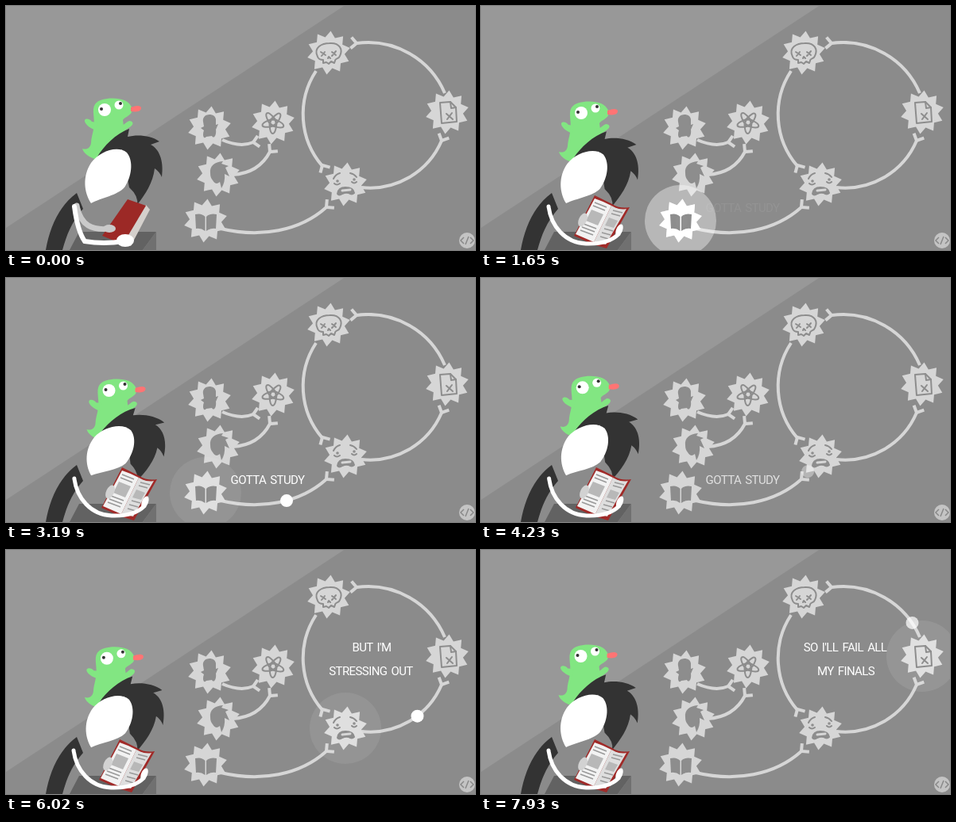
These frames come from a looping animation (590 px wide and 308 px high, 7990 ms). An HTML page:

```html
<!DOCTYPE html>
<html lang="en">
<head>
<meta charset="utf-8">
<title>Gotta study</title>
<style>
  html, body { margin: 0; width: 100%; height: 100%; overflow: hidden; background: #8b8b8b; }
  svg { display: block; width: 590px; height: 308px; }
  text { font: 400 15px Roboto, "Open Sans", sans-serif; letter-spacing: -.6px; word-spacing: 2px; fill: #fff; text-anchor: middle; }
  .line { fill: none; stroke: #d6d6d6; stroke-width: 4; }
  .ink { fill: none; stroke: #8d8d8d; stroke-width: 2; stroke-linejoin: round; stroke-linecap: round; }
  .solid { fill: #8d8d8d; }
  .arm { fill: none; stroke: #fff; stroke-width: 7; stroke-linecap: round; }
</style>
</head>
<body>
<svg viewBox="0 0 590 308">
  <rect width="590" height="308" fill="#8b8b8b"/>
  <path d="M0 0H425L0 280Z" fill="#989898"/>

  <g id="wires" class="line">
    <path d="M390 82A100 100 0 0 0 398 202"/>
    <path d="M552 110A105 105 0 0 0 441 47"/>
    <path d="M447 229A98 98 0 0 0 548 170"/>
    <path d="M270 281C320 293 370 284 403 254"/>
    <path d="M272 169Q295 179 311 172"/>
    <path d="M285 213Q318 211 332 184"/>
  </g>
  <g id="bursts"></g>
  <g id="halos" fill="#fff"></g>
  <g id="flashes"></g>
  <g id="icons">
    <g transform="translate(406 59)" class="ink">
      <path d="M-14 5C-20-7-8-12 1-12C14-13 18-4 14 4C13 8 8 7 8 10L7 13L3 11L0 14L-3 12L-7 13L-7 9C-10 9-13 8-14 5Z"/>
      <path d="M-10-1L-4 3M-5-1L-9 4M4-1L9 3M9-2L4 4M-1 7L0 5L2 7"/>
    </g>
    <g transform="translate(555 134)" class="ink">
      <path d="M-9-12L4-13L11-6L12 12L-7 14Z"/>
      <path d="M4-13L5-5L11-6M-1 2L7 9M6 1L0 9"/>
    </g>
    <g transform="translate(427 225)" class="ink">
      <path d="M-15-7Q-12-13-7-14M6-14Q11-13 14-9M-14-1Q-11 2-7-1M8-3Q11 0 14-3"/>
      <circle cx="-10" cy="-4" r=".8"/><circle cx="11" cy="-6" r=".8"/>
      <path class="solid" d="M-10 12Q-9 4 0 4Q10 4 11 11Q8 14 4 11Q0 10-4 12Q-8 15-10 12Z"/>
      <path d="M-4 8L6 7" style="stroke:#d6d6d6;stroke-width:3"/>
    </g>
    <g id="knot" transform="translate(336 147)" class="ink"></g>
    <path class="solid" d="M248 146C246 135 263 134 264 143L264 150L267 149L264 156C265 164 261 168 259 164L252 165C248 169 247 162 249 157L245 154L249 152Z"/>
    <path class="solid" d="M257 211C256 202 262 197 273 196L271 199L280 202L276 204L281 215L275 212Q276 222 271 230L269 222Q264 227 260 220Q257 217 257 211Z"/>
    <path class="solid" d="M238 263Q246 261 250.500 266V284Q245 280 239 281ZM252 266Q257 261 265 263L264 281Q257 280 252 284Z"/>
  </g>
  <circle id="pulse" r="8" fill="#fff"/>
  <g id="captions">
    <g><text x="329" y="260">GOTTA STUDY</text></g>
    <g><text x="460" y="128">BUT I'M</text><text x="459" y="158">STRESSING OUT</text></g>
    <g><text x="458" y="128">SO I'LL FAIL ALL</text><text x="459" y="158">MY FINALS</text></g>
  </g>

  <circle cx="580" cy="296" r="10" fill="#c4c4c4"/>
  <path d="M576 292L572 296L576 300M584 292L588 296L584 300M582 291L578 301" fill="none" stroke="#898989" stroke-width="1.500"/>

  <path d="M92 285H189L172 308H80Z" fill="#626262"/>
  <path d="M189 285V308H172Z" fill="#707070"/>
  <g id="critter">
    <path fill="#82e682" d="M114 194C103 190 98 186 96 180C102 182 106 179 107 173C107 167 109 162 110 156C113 144 107 131 112 124C118 115 140 115 149 119C157 123 160 129 158 134C156 139 149 140 147 144L148 152L152 164L130 194Z"/>
    <path id="leftPaw" fill="#82e682" d="M113 157C105 154 98 148 99 144C101 141 106 143 108 146L115 147Z"/>
    <path id="rightPaw" fill="#82e682" d="M143 150C148 152 150 147 155 145C160 145 161 149 157 152L145 160Z"/>
    <path fill="#ff7474" d="M157 128Q168 124 170 128Q171 135 157 133Z"/>
    <circle cx="124" cy="131" r="8" fill="#fff"/><circle cx="142" cy="125" r="5.500" fill="#fff"/>
    <circle cx="120" cy="130" r="2" fill="#333"/><circle cx="144" cy="123" r="2" fill="#333"/>
  </g>
  <path id="back" fill="#333" d="M89 236L97 256C82 273 76 290 71 308H50C55 280 66 253 89 236Z"/>
  <g id="torso">
    <path fill="#333" d="M115 190C123 177 138 161 155 155L153 165C165 162 182 163 193 171L182 175C192 180 199 194 196 216Q193 209 187 205C185 223 175 238 165 251Q167 240 155 229L146 181Z"/>
    <path fill="#fff" d="M107 249C98 235 96 215 107 198C117 184 140 175 152 185C161 196 158 216 149 229C140 239 120 242 107 249Z"/>
  </g>

  <g id="closedBook">
    <path class="arm" style="stroke:#cacaca" d="M89 252C94 277 108 284 132 281"/>
    <path d="M176 251L181 257L157 303L146 299Z" fill="#d4d0cc"/>
    <path d="M153 244L176 252L147 301L121 290Z" fill="#9c2926"/>
    <ellipse cx="130" cy="281" rx="8" ry="5" fill="#cacaca"/>
    <path class="arm" style="stroke-width:6" d="M86 253Q90 284 99 297Q123 301 148 297"/>
    <ellipse cx="150" cy="296" rx="11" ry="8" fill="#fff"/>
  </g>
  <g id="openBook">
    <path d="M143 239L165 250Q174 256 187 254L158 306L141 301L117 290Z" fill="#a02a28"/>
    <path d="M143 243Q155 247 164 252L142 298L119 288Z" fill="#f2f2f2"/>
    <path d="M164 252Q174 258 183 256L157 301L142 298Z" fill="#dedede"/>
    <g fill="none" stroke="#999" stroke-width="1.500">
      <path d="M143 248L158 254M141 252L156 258M129 275L145 281M127 279L143 285M125 283L141 289"/>
      <path d="M166 258L178 261M164 262L175 265M155 281L166 284M152 286L163 289M150 291L160 294"/>
    </g>
    <path d="M139 257L154 263L147 277L132 271ZM161 267L172 271L167 280L156 277Z" fill="#b8b8b8"/>
    <ellipse cx="128" cy="270" rx="5" ry="9" transform="rotate(25 128 270)" fill="#d2d2d2"/>
  </g>
  <g id="frontArm">
    <path class="arm" style="stroke-width:5" d="M85 253C88 278 106 299 132 300Q160 301 173 288"/>
    <ellipse cx="174" cy="283" rx="4" ry="8" transform="rotate(22 174 283)" fill="#fff"/>
  </g>
  <path id="cursor" d="M0 0V16L4 12.500L7 19L10 17.500L7 11.500H12Z" fill="#000" stroke="#fff"/>
</svg>
<script>
const LOOP = 7990, TRAVEL = 2720;
const $ = id => document.getElementById(id);
const clamp = v => Math.max(0, Math.min(1, v));
const make = (tag, attrs, parent) => {
  const el = document.createElementNS('http://www.w3.org/2000/svg', tag);
  for (const k in attrs) el.setAttribute(k, attrs[k]);
  return parent.appendChild(el);
};
const move = (id, value) => $(id).setAttribute('transform', value);
const show = (id, on) => $(id).setAttribute('visibility', on ? 'visible' : 'hidden');

// Eased interpolation through [time, value] pairs
function track(keys, t) {
  const i = keys.findIndex(k => k[0] > t);
  if (i < 0) return keys[keys.length - 1][1];
  if (i === 0) return keys[0][1];
  const [t0, a] = keys[i - 1], [t1, b] = keys[i];
  return a + (b - a) * (1 - Math.cos(Math.PI * (t - t0) / (t1 - t0))) / 2;
}

// Ten-pointed star with one spike pointing almost straight up
function burst(x, y, fill, parent) {
  const pts = Array.from({ length: 20 }, (_, i) => {
    const angle = -1.48 + i * Math.PI / 10;
    const r = i % 2 ? 20 : 27.5;
    return `${(x + r * Math.cos(angle)).toFixed(1)},${(y + r * Math.sin(angle)).toFixed(1)}`;
  });
  return make('polygon', { points: pts.join(' '), fill }, parent);
}

[[406, 59], [555, 134], [427, 225], [336, 147], [256, 154], [267, 213], [251, 271]]
  .forEach(([x, y]) => burst(x, y, '#d6d6d6', $('bursts')));

[[441, 47, 185], [398, 201, 60], [403, 254, -40], [548, 170, -65], [332, 184, -50], [311, 172, -10]]
  .forEach(([x, y, a]) => make('path', {
    d: 'M7-7L0 0L7 7', transform: `translate(${x} ${y}) rotate(${a})`
  }, $('wires')));

for (let i = 0; i < 5; i++) {
  make('ellipse', { cx: 4, rx: 10, ry: 4, transform: `rotate(${20 + i * 72})` }, $('knot'));
}

const captions = [...$('captions').children];
const signals = [
  { at: 1630, end: 4600, x: 251, y: 271, d: 'M251 271L275 282C320 293 370 284 403 254L427 225' },
  { at: 4600, end: 7320, x: 427, y: 225, d: 'M427 225L456 230A98 98 0 0 0 548 170L555 134' },
  { at: 7320, end: 7320 + TRAVEL, x: 555, y: 134, d: 'M555 134L551 107A105 105 0 0 0 441 47L406 59' }
].map((s, i) => {
  const halo = make('g', {}, $('halos'));
  make('circle', { cx: s.x, cy: s.y, r: 45 }, halo);
  const core = make('circle', { cx: s.x, cy: s.y, r: 38 }, halo);
  const route = make('path', { d: s.d, fill: 'none' }, document.querySelector('svg'));
  return { ...s, halo, core, route, length: route.getTotalLength(),
    flash: burst(s.x, s.y, '#fff', $('flashes')), caption: captions[i] };
});

const breath = [[0, 0], [400, -3], [600, -1], [990, -6], [1650, 4], [2050, 6], [2460, 5], [3190, 11],
  [4090, 7], [4600, 9], [5190, 5], [5740, 4], [6100, 6], [6540, 2], [6950, 1], [7450, 4], [7930, 3]];
const bookShift = [[0, -8], [990, -8], [1650, 0], [3190, 3], [5190, 1], [6950, -1], [7930, 0]];

function drawSignal(s, t) {
  const age = t - s.at, on = age >= 0;
  const glow = on ? Math.exp(-age / 170) : 0;
  const rest = on ? 0.075 * clamp((2300 - age) / 700) : 0;
  s.halo.setAttribute('opacity', rest + 0.35 * glow);
  s.core.setAttribute('opacity', 0.5 * glow);
  s.flash.setAttribute('opacity', Math.min(1, glow + rest * 2));
  s.caption.setAttribute('opacity', Math.min(clamp(age / 300), clamp((s.end - t) / 500)));
  if (!on || t >= s.end) return;
  const p = s.route.getPointAtLength(s.length * age / (s.end - s.at));
  $('pulse').setAttribute('cx', p.x);
  $('pulse').setAttribute('cy', p.y);
  $('pulse').setAttribute('opacity', Math.min(clamp(age / 850), clamp((s.end - t) / 1000)));
}

function draw(t) {
  const a = track(breath, t);
  move('torso', `translate(104 250) rotate(${a * 0.45}) scale(1 ${1 - a * 0.004}) translate(${-104 + Math.min(0, a) * 0.4} -250)`);
  move('critter', `translate(${a * 0.5} ${a})`);
  const wave = Math.sin(t / 260) * 5;
  move('leftPaw', `rotate(${wave} 114 151)`);
  move('rightPaw', `rotate(${-Math.max(0, -a) * 4 + wave * 0.6} 144 154)`);
  move('back', `translate(0 ${Math.min(0, a) * 0.5})`);

  const opening = clamp((t - 350) / 350), shift = track(bookShift, t);
  show('closedBook', opening === 0);
  show('openBook', opening > 0);
  show('frontArm', opening > 0);
  move('openBook', `translate(${164 + shift} ${Math.min(0, shift) * 0.3}) scale(${0.4 + 0.6 * opening} 1) translate(-164 0)`);
  move('frontArm', `translate(${shift * 0.3} 0)`);

  show('cursor', t > 570 && t < 1590);
  move('cursor', `translate(${track([[570, 212], [940, 142], [1250, 142], [1590, 217]], t)} ${track([[570, 290], [940, 281], [1250, 281], [1590, 286]], t)})`);

  $('pulse').setAttribute('opacity', 0);
  signals.forEach(s => drawSignal(s, t));
}

const start = performance.now();
function tick(now) {
  draw(Math.max(0, now - start) % LOOP);
  requestAnimationFrame(tick);
}
draw(0);
requestAnimationFrame(tick);
</script>
</body>
</html>
```
